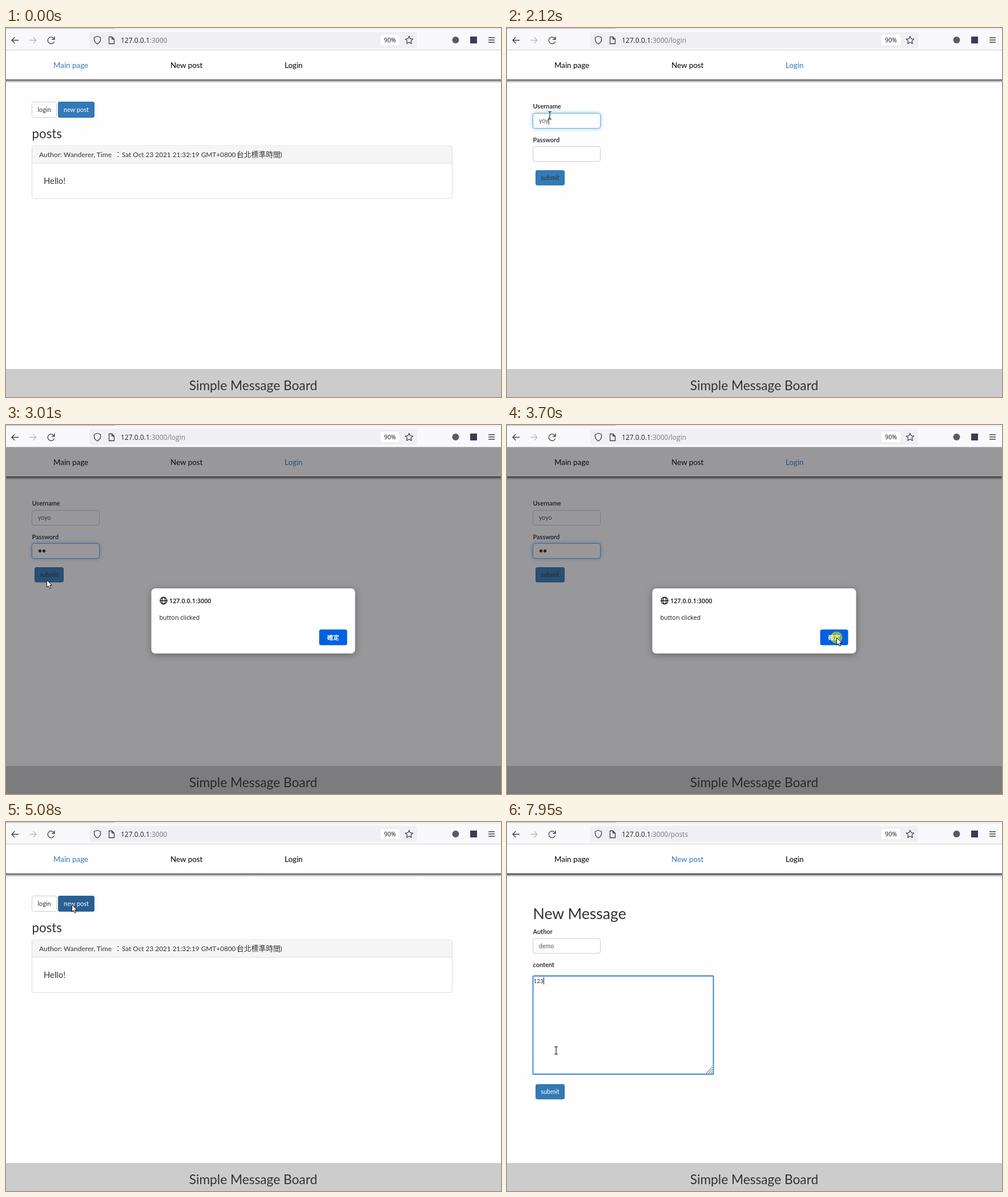
Animation, 867 px wide and 646 px high, one loop 8000 ms. Source, as an HTML page:

```html
<!DOCTYPE html>
<html lang="en">
<head>
<meta charset="utf-8">
<title>Message board</title>
<style>
html, body { margin: 0; width: 100%; height: 100%; overflow: hidden; background: #fff; }
svg { display: block; width: 100vw; height: 100vh; font-family: Lato, sans-serif; fill: #333; }
text { white-space: pre; }
.ui { font-family: "Open Sans", sans-serif; }
.cjk { font-family: "Noto Sans CJK TC", "Noto Sans CJK", sans-serif; }
.icon { fill: none; stroke: #3d3d48; stroke-width: 1.3; stroke-linecap: round; stroke-linejoin: round; }
.ring { fill: #fff; stroke: #66afe9; filter: drop-shadow(0 0 3px rgba(102,175,233,.8)); }
.caret { stroke: #222; }
</style>
</head>
<body>
<svg id="stage" viewBox="0 0 867 646" preserveAspectRatio="none"></svg>
<script>
const LOOP = 8000;
const BLUE = '#337ab7';
const stage = document.getElementById('stage');

const text = (x, y, size, str, attrs = '') =>
  `<text x="${x}" y="${y}" font-size="${size}" ${attrs}>${str}</text>`;
const rect = (x, y, w, h, fill, attrs = '') =>
  `<rect x="${x}" y="${y}" width="${w}" height="${h}" fill="${fill}" ${attrs}/>`;
const group = (id, body) => `<g id="${id}">${body}</g>`;
const label = (y, str) => text(45.5, y, 10.9, str, 'font-weight="700"');
const field = (id, y) =>
  rect(45.5, y, 118, 26, '#fff', 'rx="3.5" stroke="#ccc"') +
  `<rect id="${id}Ring" class="ring" x="45.5" y="${y}" width="118" height="26" rx="3.5"/>` +
  text(56, y + 16.5, 10.6, '', `id="${id}" fill="#555"`) +
  `<path id="${id}Caret" class="caret" d="M0 ${y + 7}v13"/>`;
const button = (id, x, y, w, h, str, color) =>
  rect(x, y, w, h, BLUE, `id="${id}" rx="2.5" stroke="#2e6da4"`) +
  text(x + w / 2, y + h / 2 + 4, 10.9, str, `text-anchor="middle" fill="${color}"`);

const chrome =
  rect(0, 0, 867, 39, '#f9f9fb') + rect(0, 0, 867, 3, '#f0f0f4') +
  rect(0, 0, 190, 1, '#bbb') + rect(0, 38, 867, 1, '#ccc') +
  rect(146, 7, 574, 28, '#f0f0f4', 'rx="4"') + rect(656, 12, 33, 18, '#fff', 'rx="3"') +
  `<g class="icon">
    <path d="M21.5 21.5H10m5-5-5 5 5 5"/>
    <path d="M41.500 21.5H53m-5-5 5 5-5 5" stroke="#bbbbc0"/>
    <path d="M84.300 19.500A5.800 5.800 0 1 0 84.300 24M85 15.500v4.500h-4.500"/>
    <path d="M160 14.500 165.500 16.500V20Q165.500 25 160 28Q154.500 25 154.500 20V16.500Z"/>
    <path d="M180.500 15.500h5l4 4v8h-9zM185.500 15.500v4h4"/>
    <path d="M706 14.500 708 18.800 712.700 19.400 709.300 22.600 710.100 27.300 706 25 701.900 27.300 702.700 22.600 699.300 19.400 704 18.800Z"/>
    <path d="M845.500 17h10m-10 4h10m-10 4h10"/>
  </g>
  <circle cx="787.500" cy="21" r="6" fill="#5b5b66"/>` +
  rect(813, 15, 12, 12, '#3a3c55') +
  `<text class="ui" x="201" y="25.500" font-size="12" fill="#222">127.0.0.1<tspan id="url" fill="#77777f"></tspan></text>` +
  text(672.5, 25, 10.6, '90%', 'class="ui" text-anchor="middle" fill="#15141a"');

const navItem = (id, x, str) => text(x, 70, 13.4, str, `id="${id}"`);
const nav =
  rect(0, 90, 867, 6, 'url(#shade)', 'id="shadow"') +
  navItem('navMain', 83, 'Main page') + navItem('navPost', 288, 'New post') + navItem('navLogin', 488, 'Login');

const mainPage =
  rect(45.5, 129.5, 43, 27, '#fff', 'id="loginBtn" rx="3" stroke="#ccc"') +
  text(67, 147, 10.9, 'login', 'text-anchor="middle"') +
  button('newBtn', 91.5, 129.5, 63, 27, 'new post', '#fff') +
  text(45.5, 193, 22.3, 'posts') +
  rect(45.5, 206, 736, 92.5, '#fff', 'rx="3" stroke="#ddd"') +
  rect(46, 206.500, 735, 30, '#f5f5f5') + rect(46, 236, 735, 1, '#ddd') +
  text(58, 225.5, 12.1, 'Author: Wanderer, Time') +
  text(190, 225.5, 12.6, '：', 'class="cjk"') +
  text(203, 225.5, 11.8, 'Sat Oct 23 2021 21:32:19 GMT+0800 (') +
  text(404, 226, 12.8, '台北標準時間', 'class="cjk"') +
  text(480.5, 225.5, 11.8, ')') +
  text(66, 272.5, 14.8, 'Hello!');

const loginPage =
  label(141, 'Username') + field('user', 149.5) +
  label(199.5, 'Password') + field('pass', 207.5) +
  '<circle id="dot0" cx="59.500" cy="220.500" r="2.700"/><circle id="dot1" cx="66.500" cy="220.500" r="2.700"/>' +
  button('loginSubmit', 50.5, 249.5, 50, 25.5, 'submit', '#333');

const postPage =
  text(45.5, 170, 26.6, 'New Message') +
  label(196, 'Author') + field('author', 204) +
  label(254, 'content') +
  rect(45.5, 269.5, 316, 172, '#fff', 'id="area" rx="1"') +
  '<path d="M349 440l11-11m-7 11 7-7m-3 7 3-3" stroke="#444" fill="none"/>' +
  text(46.5, 281.5, 10.7, '', 'id="content"') +
  '<path id="contentCaret" class="caret" d="M0 271.500v13"/>' +
  button('postSubmit', 50.5, 459.5, 50, 25.5, 'submit', '#fff');

const dialog =
  rect(0, 39, 867, 607, '#1c1b22', 'opacity=".45"') +
  rect(254.5, 286, 357, 114, '#fff', 'rx="7" style="filter:drop-shadow(0 2px 6px rgba(0,0,0,.35))"') +
  '<g class="icon" style="stroke:#15141a"><circle cx="276" cy="307.500" r="6"/><ellipse cx="276" cy="307.500" rx="2.800" ry="6"/><path d="M270 307.500h12"/></g>' +
  text(286, 311.5, 10.8, '127.0.0.1:3000', 'class="ui" font-weight="600" fill="#15141a"') +
  text(268.5, 341, 10.8, 'button clicked', 'class="ui" fill="#15141a"') +
  rect(548.5, 358, 49, 27.5, '#0061e0', 'rx="3.5"') +
  text(573, 376, 10.6, '確定', 'class="cjk" text-anchor="middle" font-weight="700" fill="#fff"');

stage.innerHTML =
  `<defs><linearGradient id="shade" x2="0" y2="1"><stop stop-color="#000" stop-opacity=".85"/>
   <stop offset=".4" stop-color="#000" stop-opacity=".45"/><stop offset="1" stop-color="#000" stop-opacity="0"/></linearGradient></defs>` +
  rect(0, 0, 867, 646, '#fefefe') + rect(0, 39, 867, 51, '#fff') + chrome + nav +
  group('main', mainPage) + group('login', loginPage) + group('post', postPage) +
  rect(0, 597, 867, 49, '#ccc') +
  text(433, 634, 22.7, 'Simple Message Board', 'text-anchor="middle"') +
  group('status', rect(-1, 628.5, 226.5, 19, '#f6f6f8', 'stroke="#ddd"') +
    text(-1, 641.5, 10, '127.0.0.1', 'class="ui" fill="#444"')) +
  group('dialog', dialog) +
  group('pointer',
    '<circle id="glow" r="10.500" fill="#ff0" opacity=".5"/>' +
    '<path id="arrow" d="M.5.5V13.200L3.400 10.600 5.500 15.300 7.700 14.300 5.600 9.700H9.600Z" fill="#fff" stroke="#111"/>' +
    '<path id="beam" d="M-3-6.500h2.300l.7.700.7-.7H3M0-6V6M-3 6.500h2.300l.7-.7.7.7H3" fill="none" stroke="#222" stroke-width="1.200"/>');

const el = {};
stage.querySelectorAll('[id]').forEach(n => el[n.id] = n);

const show = (id, on) => el[id].style.display = on ? '' : 'none';
const set = (id, attrs) => { for (const k in attrs) el[id].setAttribute(k, attrs[k]); };
const within = (t, a, b) => t >= a && t < b;
const ramp = (t, a, b) => Math.min(1, Math.max(0, (t - a) / (b - a)));
const typed = (str, t, start, step) =>
  str.slice(0, Math.max(0, Math.floor((t - start) / step) + 1));

// time, x, y
const path = [
  [70, 818, 634], [830, 76, 184], [960, 75, 153], [2600, 75, 153], [2870, 71, 271],
  [3400, 71, 271], [3690, 577, 372], [3860, 577, 372], [4200, 288, 279],
  [4740, 104, 169], [4930, 104, 169], [5090, 115, 144], [5430, 115, 144],
  [5740, 206, 238], [6200, 97, 213], [7060, 97, 213], [7420, 86, 400]
];
const clicks = [[1080, 1220], [1770, 1910], [2900, 3000], [3690, 3840], [5150, 5290], [6170, 6290], [7420, 7530]];

function pointerAt(t) {
  const i = path.findIndex(p => p[0] > t);
  if (i < 0) return path[path.length - 1].slice(1);
  if (i === 0) return path[0].slice(1);
  const [a, b] = [path[i - 1], path[i]];
  const u = ramp(t, a[0], b[0]), e = u * u * (3 - 2 * u);
  return [a[1] + (b[1] - a[1]) * e, a[2] + (b[2] - a[2]) * e];
}

function write(id, str, caret) {
  el[id].textContent = str;
  show(id + 'Caret', caret);
  if (caret) {
    const x = Number(el[id].getAttribute('x')) + (str ? el[id].getComputedTextLength() : 0);
    set(id + 'Caret', { transform: `translate(${x + .5} 0)` });
  }
}

function render(t) {
  const page = t < 1440 ? 'main' : t < 3980 ? 'login' : t < 5400 ? 'main' : 'post';
  for (const p of ['main', 'login', 'post']) show(p, p === page);
  el.url.textContent = ':3000' + (within(t, 1240, 3950) ? '/login' : t >= 5300 ? '/posts' : '');
  set('navMain', { fill: page === 'main' ? BLUE : '#000' });
  set('navLogin', { fill: page === 'login' ? BLUE : '#000' });
  set('navPost', { fill: page === 'post' ? BLUE : '#000' });
  set('shadow', { opacity: page === 'post' ? 1.0 : .85 });

  const hover = within(t, 900, 1440);
  set('loginBtn', { fill: hover ? '#e6e6e6' : '#fff', stroke: hover ? '#adadad' : '#ccc' });
  set('newBtn', { fill: within(t, 5000, 5400) ? '#286090' : BLUE });
  show('status', within(t, 1240, 1560) || within(t, 3735, 4040));
  show('dialog', within(t, 2990, 3735));

  if (page === 'login') {
    write('user', typed('yoyo', t, 1960, 75), within(t, 1800, 2270));
    write('pass', '', within(t, 2270, 2380));
    set('userRing', { opacity: ramp(t, 1780, 1900) - ramp(t, 2270, 2400) });
    set('passRing', { opacity: ramp(t, 2270, 2400) - ramp(t, 3700, 3765) });
    show('dot0', t >= 2380);
    show('dot1', t >= 2460);
  }

  if (page === 'post') {
    const name = typed('demo', t, 6710, 90);
    write('author', name || 'author', false);
    set('author', { fill: name ? '#555' : '#8a9590' });
    if (name) write('author', name, t < 7430);
    else if (t >= 6220) {
      show('authorCaret', true);
      set('authorCaret', { transform: 'translate(56.5 0)' });
    }
    set('authorRing', { opacity: ramp(t, 6190, 6300) - ramp(t, 7440, 7580) });

    const body = typed('123', t, 7620, 110), focus = t >= 7430;
    set('content', { fill: body ? '#222' : '#8a9590', 'font-size': body ? 10 : 10.7 });
    write('content', body || 'please enter content', !!body);
    if (focus && !body) {
      show('contentCaret', true);
      set('contentCaret', { transform: 'translate(46.5 0)' });
    }
    set('area', { stroke: focus ? '#2f7fd6' : '#858585', 'stroke-width': focus ? 1.8 : 1 });
  }

  const [x, y] = pointerAt(t);
  const beam = within(t, 1290, 2640) || t >= 6130;
  show('pointer', t >= 70);
  set('pointer', { transform: `translate(${x} ${y})` });
  show('beam', beam);
  show('arrow', !beam);
  show('glow', clicks.some(c => within(t, ...c)));
}

const start = performance.now();
function tick() {
  render((performance.now() - start) % LOOP);
  requestAnimationFrame(tick);
}
tick();
</script>
</body>
</html>
```
